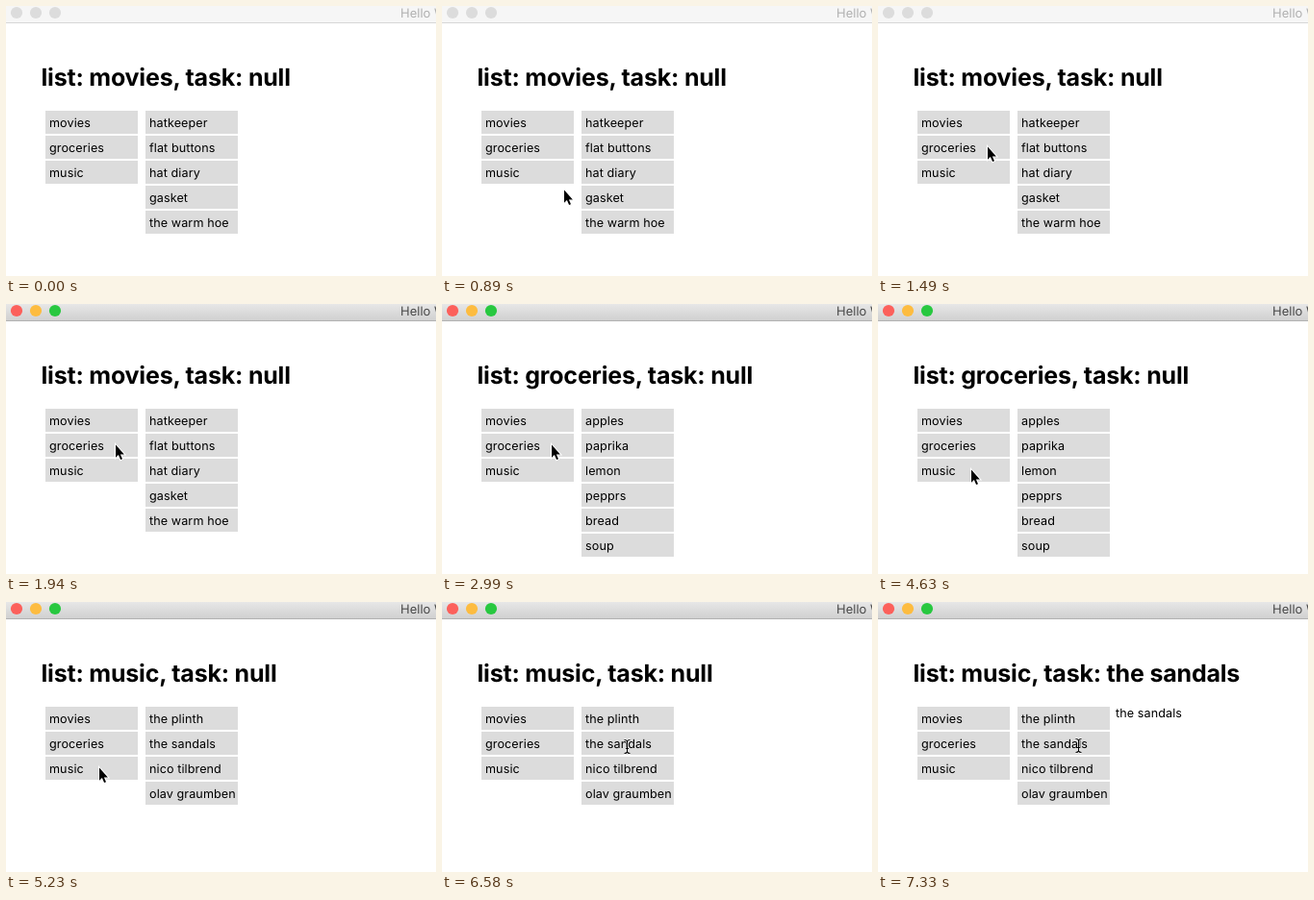
Animation, 447 px wide and 281 px high, one loop 8000 ms. Source, as an HTML page:

```html
<!DOCTYPE html>
<html lang="en">
<head>
<meta charset="utf-8">
<title>Lists and tasks</title>
<style>
html, body { margin: 0; width: 100%; height: 100%; overflow: hidden; background: #fff; }
svg {
  display: block; width: 447px; height: 281px;
  font: 12.6px Inter, "Open Sans", sans-serif;
  letter-spacing: 0.09px;
  text-rendering: geometricPrecision;
}
#title { font-size: 13px; letter-spacing: 0; }
#head { font-size: 25px; font-weight: 700; letter-spacing: -0.2px; }
</style>
</head>
<body>
<svg viewBox="0 0 447 281">
  <defs>
    <linearGradient id="chrome" x2="0" y2="1">
      <stop stop-color="#e7e7e7"/><stop offset="1" stop-color="#d0d0d0"/>
    </linearGradient>
    <path id="tip" d="M1 1.5V14.8L3.9 12.1L6.1 17.1L8 16.3L5.9 11.4H9.9Z"/>
    <path id="stem" d="M1.5 2.5Q4 2.5 4.5 4Q5 2.5 7.5 2.5M4.5 4V15M1.5 16.5Q4 16.5 4.5 15Q5 16.5 7.5 16.5M3 11.5H6"/>
  </defs>
  <rect width="447" height="281" fill="#fff"/>
  <rect id="bar" width="447" height="17"/>
  <rect id="edge" y="17" width="447" height="1"/>
  <g id="dots"></g>
  <text id="title" x="410" y="12">Hello World</text>
  <text id="head" x="36.5" y="83"></text>
  <g id="lists"></g>
  <g id="tasks"></g>
  <text id="detail" x="247" y="120"></text>
  <g id="arrow">
    <use href="#tip" opacity=".2" transform="translate(.5 1)"/>
    <use href="#tip" stroke="#fff" stroke-width="2" paint-order="stroke"/>
  </g>
  <g id="beam" fill="none">
    <use href="#stem" stroke="#fff" stroke-width="2.4" stroke-opacity=".8"/>
    <use href="#stem" stroke="#000" stroke-width="1.1"/>
  </g>
</svg>
<script>
const LOOP = 8000;
const ACTIVE_AT = 1940;
const DATA = {
  movies: ["hatkeeper", "flat buttons", "hat diary", "gasket", "the warm hoe"],
  groceries: ["apples", "paprika", "lemon", "pepprs", "bread", "soup"],
  music: ["the plinth", "the sandals", "nico tilbrend", "olav graumben"]
};

// [start, list, task]
const VIEWS = [
  [0, "movies", null],
  [2990, "groceries", null],
  [5230, "music", null],
  [7330, "music", DATA.music[1]]
];

// [start, x, y, pointer]
const POINTER = [
  [0, 0, 0, ""],
  [590, 176, 276, "arrow"], [740, 143, 222, "arrow"], [890, 126, 190, "arrow"],
  [1040, 116, 161, "arrow"], [1190, 114, 153, "arrow"], [1340, 113, 146, "arrow"],
  [1490, 113, 145, "arrow"], [3890, 113, 146, "arrow"], [4030, 112, 147, "arrow"],
  [4180, 110, 151, "arrow"], [4330, 102, 164, "arrow"], [4480, 96, 172, "arrow"],
  [4630, 96, 171, "arrow"], [6280, 104, 167, "arrow"], [6430, 164, 144, "beam"],
  [6580, 188, 141, "beam"], [6730, 203, 139, "beam"], [6880, 204, 139, "beam"],
  [7030, 204, 140, "beam"]
];

const $ = id => document.getElementById(id);
const at = (steps, t) => steps.findLast(s => s[0] <= t);

const column = (x, items) => items.map((name, i) =>
  `<rect x="${x}" y="${109 + 26 * i}" width="96" height="24" fill="#dcdcdc"/>` +
  `<text x="${x + 4}" y="${126 + 26 * i}">${name}</text>`).join("");

function drawChrome(active) {
  const colors = active ? ["#fc605b", "#fdbc40", "#28c840"] : Array(3).fill("#dcdcdc");
  $("bar").setAttribute("fill", active ? "url(#chrome)" : "#f6f6f6");
  $("edge").setAttribute("fill", active ? "#b1b1b1" : "#d6d6d6");
  $("title").setAttribute("fill", active ? "#484848" : "#b0b0b0");
  $("dots").innerHTML = colors.map((c, i) =>
    `<circle cx="${11 + 20 * i}" cy="7" r="6.1" fill="${c}"/>`).join("");
}

function drawView([, list, task]) {
  $("head").textContent = `list: ${list}, task: ${task}`;
  $("tasks").innerHTML = column(145, DATA[list]);
  $("detail").textContent = task || "";
}

function drawPointer([, x, y, kind]) {
  for (const id of ["arrow", "beam"]) {
    $(id).setAttribute("visibility", id === kind ? "visible" : "hidden");
    $(id).setAttribute("transform", `translate(${x} ${y})`);
  }
}

let view, active;
function tick() {
  const t = performance.now() % LOOP;
  const nextView = at(VIEWS, t), nextActive = t >= ACTIVE_AT;
  if (nextView !== view) drawView(view = nextView);
  if (nextActive !== active) drawChrome(active = nextActive);
  drawPointer(at(POINTER, t));
  requestAnimationFrame(tick);
}

$("lists").innerHTML = column(41, Object.keys(DATA));
tick();
</script>
</body>
</html>
```
